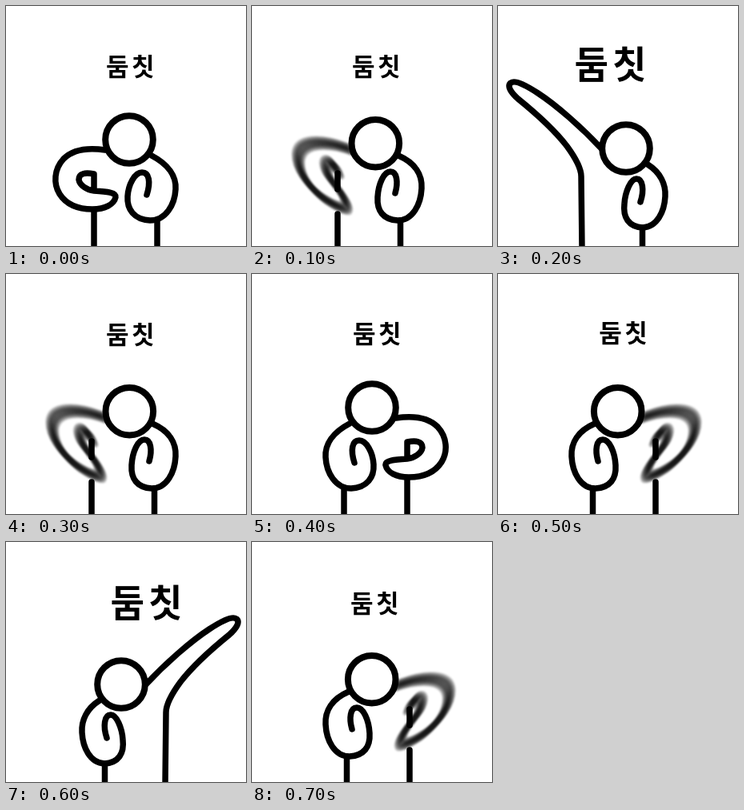
Animation, 300 px wide and 300 px high, one loop 800 ms. Source, as an HTML page:

```html
<!DOCTYPE html>
<html lang="ko">
<head>
<meta charset="utf-8">
<style>
  html, body { margin: 0; width: 100%; height: 100%; overflow: hidden; background: #fff; }
  svg { display: block; width: 100vw; height: 100vh; }
  path { fill: none; stroke: #000; stroke-width: 7.5; stroke-linecap: round; stroke-linejoin: round; }
  circle { fill: #fff; stroke: #000; stroke-width: 8; }
  text { font: 700 31px "Noto Sans CJK KR", "Noto Sans CJK", "Noto Sans CJK JP", sans-serif; letter-spacing: .11em; }
  .smear { filter: blur(.8px); }
  .smear path { opacity: .17; }
</style>
</head>
<body>
<svg viewBox="0 0 300 300">
  <g id="body"></g>
  <text id="beat">둠칫</text>
</svg>
<script>
const body = document.getElementById('body');
const beat = document.getElementById('beat');

const path = (d, extra = '') => `<path d="${d}" ${extra}/>`;
const head = (x, y) => `<circle cx="${x}" cy="${y}" r="29.8"/>`;

// Motion blur: faint copies of the arm spread along a diagonal
const smear = (d, dx, dy) => {
  let copies = '';
  for (let k = -6; k <= 6; k++) copies += path(d, `transform="translate(${k * dx / 6} ${k * dy / 6})"`);
  return `<g class="smear">${copies}</g>`;
};

const rest =
  path('M124 180C104 177 84 179 72 191C60 204 59 222 67 235C76 249 91 254 108 254C124 254 135 248 137 239C138 233 126 232 110 231C101 230 92 224 91 217C91 209 99 208 110 210V230') +
  path('M110 256V304') +
  path('M182 187C203 198 213 213 212 229C211 248 200 268 180 268C160 267 151 254 152 238C153 223 161 208 170 208C179 208 181 220 176 236') +
  path('M189 268V304') +
  head(154, 167);

const swing =
  smear('M122 179C92 168 61 167 58 188C56 207 72 227 89 240C101 248 114 255 117 252C121 246 109 230 100 219C91 208 90 195 97 195C102 195 105 202 107 208', 5, 5.5) +
  path('M107 209V229M107 260V304') +
  path('M183 187C204 196 213 211 212 228C211 248 201 268 182 268C164 267 156 256 157 239C158 222 165 207 173 207C181 207 183 220 179 234') +
  path('M185.5 268V304') +
  head(154.3, 171.7);

const raised =
  path('M130 179C105 152 73 124 50 109C36 100 22 92 16 96C11 100 16 108 25 116C46 133 69 153 86 175C97 190 104 203 104 213L105 304') +
  path('M187 198C203 208 210 223 209 238C208 257 199 276 181 277C163 276 156 264 158 247C159 232 166 216 173 216C181 216 183 230 178 245', 'stroke-width="7"') +
  path('M180.5 277V304') +
  head(160, 178);

const poses = [rest, swing, raised, swing];

// Text placement per step: x, baseline, scale
const words = [
  [125, 86.5, 1], [125, 86.5, 1], [95.5, 89.8, 1.49], [125, 86.5, 1],
  [126, 86, 1], [126.3, 85.2, 1], [130.5, 93, 1.49], [123, 88.3, 1]
];

let shown = -1;
function draw(now) {
  const step = Math.floor(now / 100) % 8;
  if (step !== shown) {
    shown = step;
    body.innerHTML = poses[step % 4];
    body.setAttribute('transform', step < 4 ? '' : 'matrix(-1 0 0 1 304 0)');
    const [x, y, scale] = words[step];
    beat.setAttribute('transform', `translate(${x} ${y}) scale(${scale})`);
  }
  requestAnimationFrame(draw);
}
draw(performance.now());
</script>
</body>
</html>
```
